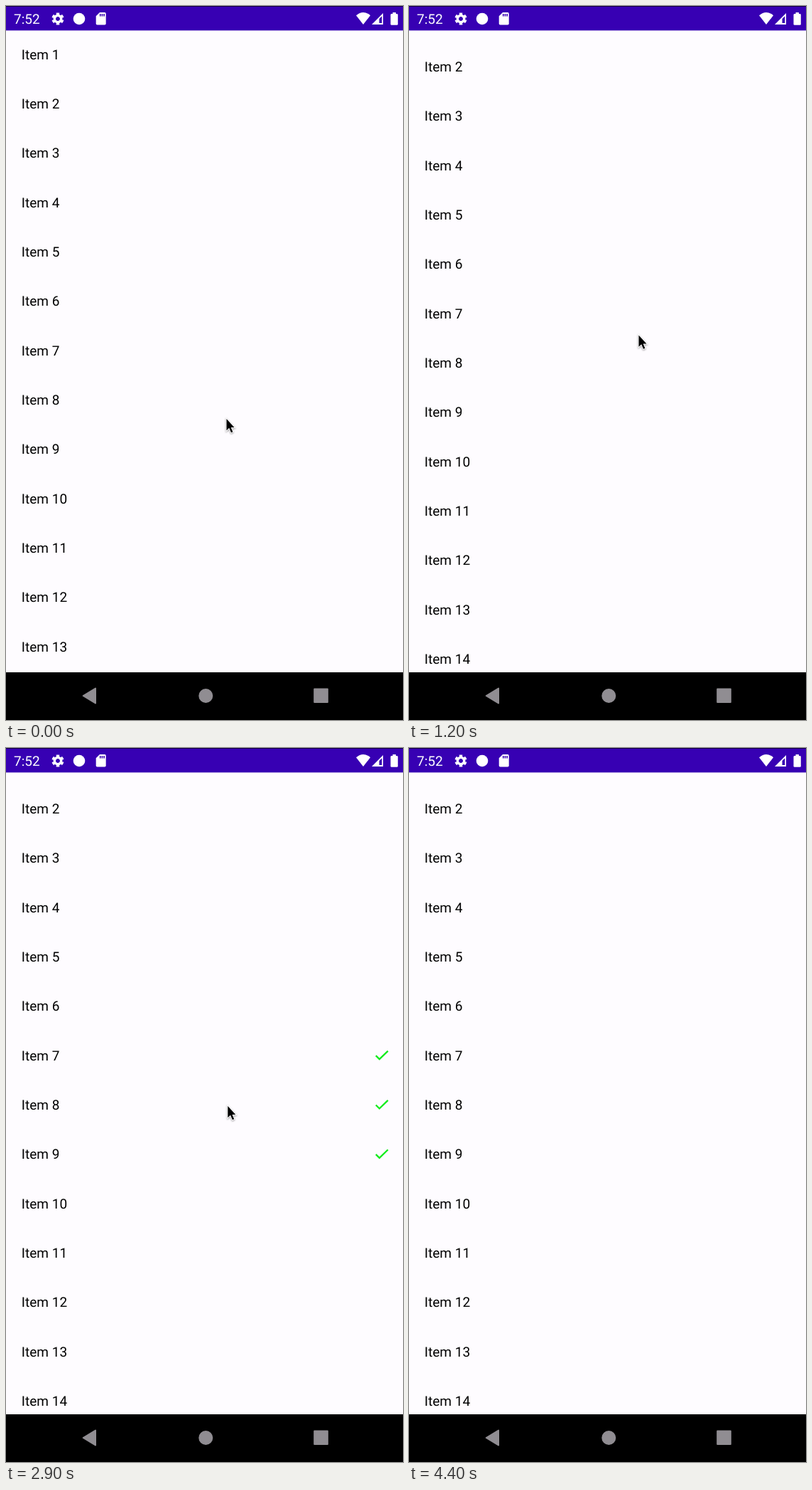
Write an HTML page that moves like this. It is 559 px wide and 1003 px high and loops after 4.9 s.

```html
<!DOCTYPE html>
<html lang="en">
<head>
<meta charset="utf-8">
<title>Selectable list</title>
<style>
  html, body { margin: 0; height: 100%; overflow: hidden; background: #fefcff; }
  svg { display: block; width: 559px; height: 1003px; }
  text { font: 19.04px Roboto, sans-serif; text-rendering: geometricPrecision; }
  #cursor { filter: drop-shadow(0 1.5px 1.3px rgba(0, 0, 0, .4)); }
</style>
</head>
<body>
<svg viewBox="0 0 559 1003">
  <rect width="559" height="1003" fill="#fefcff"/>
  <g id="list"></g>

  <!-- status bar -->
  <rect width="559" height="34.4" fill="#3700b3"/>
  <rect width="559" height="1" fill="#12003c"/>
  <g fill="#fff">
    <text x="11" y="25">7:52</text>
    <g fill="none" stroke="#fff" transform="translate(73 18)">
      <circle r="4.7" stroke-width="3.4"/>
      <circle r="7" stroke-width="3.2" pathLength="12" stroke-dasharray="1.15 .85" stroke-dashoffset="-.42"/>
    </g>
    <circle cx="103" cy="18" r="8.3"/>
    <path d="M132 9h7q1.7 0 1.7 1.7v14.1q0 1.7-1.7 1.7h-10.6q-1.7 0-1.7-1.7v-10.5z"/>
    <path d="M132.7 11v3.4m2.7-3.4v3.4m2.7-3.4v3.4" stroke="#3700b3" stroke-width="1.6"/>
    <path d="M503 26L493 13.3Q503 4.7 513 13.3Z"/>
    <path fill-rule="evenodd" d="M515 26H531V10ZM525.5 24V18L529.3 14.2V24Z"/>
    <rect x="541.5" y="11" width="10.3" height="15.8" rx="1.4"/>
    <rect x="544.5" y="9" width="4.4" height="3"/>
  </g>

  <!-- navigation bar -->
  <rect y="936" width="559" height="67"/>
  <g fill="#908d92" stroke="#908d92" stroke-width="2" stroke-linejoin="round">
    <path d="M108.7 969L126 958.5V979.5Z"/>
    <circle cx="281.3" cy="969" r="9"/>
    <rect x="434.2" y="959.5" width="18.6" height="18.6"/>
  </g>

  <path id="cursor" d="M0 0V16.2L3.7 12.8 6.5 19.2 8.9 18.2 6.2 12H11Z"
        stroke="#fff" stroke-width="2" paint-order="stroke"/>
</svg>
<script>
const LOOP = 4900, TICK = 100, ROWS = 14, PITCH = 69.33, SCROLL = 52;
const list = document.getElementById('list');
const cursor = document.getElementById('cursor');

// item number: [time checked, time unchecked]
const checked = { 7: [1400, 4100], 8: [2000, 3100], 9: [2400, 3600] };

// pointer moves: [start, end, x, y], resting in between
const home = [310.5, 580];
const moves = [
  [200, 500, 326, 515], [800, 900, 323.5, 462.5], [1500, 1800, 299.3, 513.5],
  [2000, 2200, 281, 553], [2300, 2900, 312.3, 503], [3000, 3500, 303.3, 544],
  [3600, 3900, 303.3, 447], [4200, 4300, 329, 479]
];
const GONE = 4400;

for (let n = 1; n <= ROWS; n++) {
  const y = 67.8 + PITCH * (n - 1);
  list.innerHTML += `<text x="21.8" y="${y + 6.8}">Item ${n}</text>`;
  if (checked[n]) {
    list.innerHTML += `<path id="check${n}" d="M520.8 ${y + .4}l5 5L537.8 ${y - 6.2}"
      fill="none" stroke="#12ec1c" stroke-width="2.3"/>`;
  }
}

const clamp = k => Math.min(1, Math.max(0, k));
const progress = (t, from, to) => clamp((t - from) / (to - from));
const show = (el, on) => el.setAttribute('visibility', on ? 'visible' : 'hidden');
const place = (el, x, y) => el.setAttribute('transform', `translate(${x} ${y})`);

// the drag jumps most of the way, then the list settles
const scroll = t => t < 900 ? 0 : SCROLL * (.9 + .1 * progress(t, 1000, 1200));

function pointer(t) {
  let [x, y] = home;
  for (const [from, to, toX, toY] of moves) {
    const k = progress(t, from, to);
    x += (toX - x) * k;
    y += (toY - y) * k;
  }
  return [x, y];
}

function draw(now) {
  const t = Math.floor(now % LOOP / TICK) * TICK;
  place(list, 0, -scroll(t));
  for (const n in checked) {
    const [on, off] = checked[n];
    show(document.getElementById('check' + n), t >= on && t < off);
  }
  place(cursor, ...pointer(t));
  show(cursor, t < GONE);
}

const start = performance.now();
function frame() {
  draw(performance.now() - start);
  requestAnimationFrame(frame);
}
frame();
</script>
</body>
</html>
```
